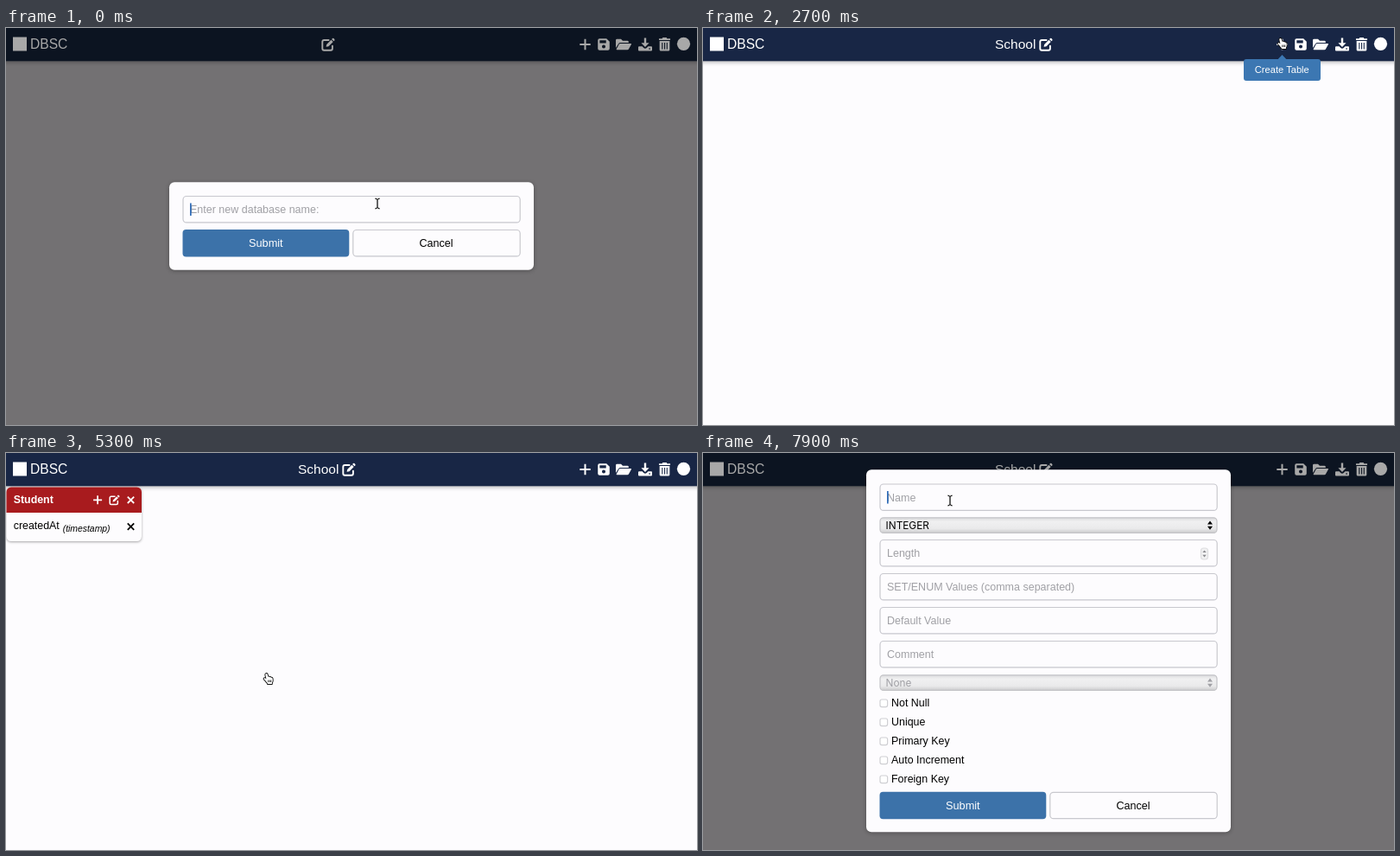
An HTML page with a canvas for the animation above (8 s loop, 800 by 459 pixels).

```html
<!DOCTYPE html>
<html lang="en">
<head>
<meta charset="utf-8">
<title>Schema editor</title>
<style>
html, body { margin: 0; width: 100%; height: 100%; overflow: hidden; background: #fdfcfe; }
canvas { display: block; width: 800px; height: 459px; }
</style>
</head>
<body>
<canvas id="stage"></canvas>
<script>
const W = 800, H = 459, LOOP = 8000, STEP = 100;
const SANS = '"Liberation Sans", Arial, sans-serif';
const UI = 'Inter, "Liberation Sans", sans-serif';
const PAPER = '#fdfcfe', LINE = '#c8c8ce', HINT = '#a0a0a5', BLUE = '#3c72a9';

const canvas = document.getElementById('stage');
const g = canvas.getContext('2d');
const dpr = window.devicePixelRatio || 1;
canvas.width = W * dpr;
canvas.height = H * dpr;

// Icons live in a 16 x 16 box.
const pencil = new Path2D('M5.6 10.6L6.2 7.9 11.4 2.7 13.7 5 8.5 10.2 5.9 10.8ZM12.1 2L13 1.1Q13.7.5 14.4 1.1L15.3 2Q15.9 2.7 15.3 3.4L14.4 4.3Z');
const sheet = new Path2D('M8.6 3H3.2Q1.3 3 1.3 4.9V12.8Q1.3 14.7 3.2 14.7H11Q12.9 14.7 12.9 12.8V9.6');
const icons = {
  save: 'M3 1H11.3L15 4.7V13Q15 15 13 15H3Q1 15 1 13V3Q1 1 3 1ZM3.2 3.2V6.4H10.8V3.2ZM8 8.4A2.1 2.1 0 1 0 8 12.6A2.1 2.1 0 1 0 8 8.4Z',
  folder: 'M-1 12V3.2Q-1 1.8 .4 1.8H5L7 3.7H12.4Q13.8 3.7 13.8 5.1V6H4Q2.9 6 2.3 7ZM3.9 7H16.3Q17.5 7 16.9 8.1L14 13.3Q13.5 14.2 12.4 14.2H.3Q-.8 14.2-.2 13.2L2.9 7.6Q3.2 7 3.9 7Z',
  download: 'M6.8 .5H9.2V6.2H12.6L8 11 3.4 6.2H6.8ZM0 11.3Q0 10.3 1 10.3H4.6L6.3 12Q8 13.3 9.7 12L11.4 10.3H15Q16 10.3 16 11.3V14.5Q16 15.5 15 15.5H1Q0 15.5 0 14.5ZM12.4 12.3V13.7H13.8V12.3Z',
  trash: 'M1.3 1.2H5L5.8 0H10.2L11 1.2H14.7V3H1.3ZM2 4.1H14V14.4Q14 16 12.4 16H3.6Q2 16 2 14.4ZM4.7 6.2V13.8H5.8V6.2ZM7.5 6.2V13.8H8.6V6.2ZM10.3 6.2V13.8H11.4V6.2Z'
};
for (const k in icons) icons[k] = new Path2D(icons[k]);

const hand = new Path2D('M3.4 1.2Q4.6.4 5.2 1.7L6.1 4.8Q7.3 4.2 7.8 5.2Q9 4.6 9.5 5.7Q10.9 5.4 11.2 6.8L11.4 9Q11.3 10.6 10.5 11.6V13H5.5V12.2Q4 11 3.2 9.6L1.2 7.4Q.9 6.2 2.2 6.1L4 7.3 2.9 2.6Q2.8 1.6 3.4 1.2Z');
const handLines = new Path2D('M6.3 8.5V11M7.9 8.5V11M9.4 8.5V11');
const arrow = new Path2D('M0 0V11.2L2.6 8.8 4.3 12.7 6.1 11.9 4.4 8.1H8Z');
const cross = new Path2D('M0-6L2.3-3.4H.8V-.8H3.4V-2.3L6 0 3.4 2.3V.8H.8V3.4H2.3L0 6-2.3 3.4H-.8V.8H-3.4V2.3L-6 0-3.4-2.3V-.8H-.8V-3.4H-2.3Z');

function box(x, y, w, h, r, fill, stroke) {
  g.beginPath();
  g.roundRect(x, y, w, h, r);
  if (fill) { g.fillStyle = fill; g.fill(); }
  if (stroke) { g.strokeStyle = stroke; g.lineWidth = 1.2; g.stroke(); }
}

function text(s, x, y, size, color, opt = {}) {
  g.font = `${opt.style || ''} ${size}px ${opt.font || SANS}`;
  g.textAlign = opt.align || 'left';
  g.fillStyle = color;
  g.fillText(s, x, y);
}

function lines(color, width, ...segs) {
  g.strokeStyle = color;
  g.lineWidth = width;
  g.beginPath();
  for (const [a, b, c, d] of segs) { g.moveTo(a, b); g.lineTo(c, d); }
  g.stroke();
}

function shadow(color, blur, dy) {
  g.shadowColor = color;
  g.shadowBlur = blur * dpr;
  g.shadowOffsetY = dy * dpr;
}

function at(x, y, scale, draw) {
  g.save();
  g.translate(x, y);
  g.scale(scale, scale);
  draw();
  g.restore();
}

function icon(name, x, y, size, color) {
  at(x - size / 2, y - size / 2, size / 16, () => {
    g.fillStyle = color;
    g.fill(icons[name], 'evenodd');
  });
}

function edit(x, y, size, color) {
  at(x - size / 2, y - size / 2, size / 16, () => {
    g.fillStyle = g.strokeStyle = color;
    g.lineWidth = 1.9;
    g.lineCap = 'round';
    g.stroke(sheet);
    g.fill(pencil);
  });
}

const plus = (x, y, r, w, c) => lines(c, w, [x - r, y, x + r, y], [x, y - r, x, y + r]);
const times = (x, y, r, w, c) => lines(c, w, [x - r, y - r, x + r, y + r], [x - r, y + r, x + r, y - r]);

function header(dim, named) {
  const ink = dim ? '#a8a8a8' : '#fff';
  g.save();
  shadow('rgba(0,0,0,.3)', 5, 1.5);
  g.fillStyle = dim ? '#0c1421' : '#182645';
  g.fillRect(-10, -10, W + 20, 48.3);
  g.restore();
  box(8, 10.5, 16, 16, 0, ink);
  text('DBSC', 28, 24, 15.6, ink);
  if (named) text('School', 338, 24, 15.5, ink);
  edit(named ? 397 : 373, 19, 16, ink);
  plus(670.5, 19, 6.2, 2, ink);
  icon('save', 692, 19, 15.5, ink);
  icon('folder', 715, 19, 16, ink);
  icon('download', 740, 19, 16, ink);
  icon('trash', 762.5, 18.8, 15.6, ink);
  g.fillStyle = ink;
  g.beginPath();
  g.arc(784.5, 18.3, 7.6, 0, 7);
  g.fill();
}

function tooltip() {
  g.fillStyle = '#3c77b2';
  g.beginPath();
  g.moveTo(670.5, 31);
  g.lineTo(675.5, 36.2);
  g.lineTo(665.5, 36.2);
  g.fill();
  box(626, 36, 89, 25, 3, '#3c77b2');
  text('Create Table', 670.3, 52.2, 11.1, '#fff', { align: 'center' });
}

function table(x, y) {
  g.save();
  g.translate(x, y);
  g.save();
  shadow('rgba(0,0,0,.35)', 3, 1);
  box(0, 0, 156.5, 62.5, 5.5, PAPER);
  g.restore();
  box(0, 0, 156.5, 29.5, [5.5, 5.5, 0, 0], '#a81b1e');
  text('Student', 8.2, 18.8, 12.4, '#fff', { style: 'bold' });
  plus(105.6, 14.8, 5, 1.7, '#fff');
  edit(125, 14.8, 12.6, '#fff');
  times(144, 14.8, 3.7, 1.8, '#fff');
  text('createdAt', 8.2, 48.6, 12.4, '#000');
  text('(timestamp)', 65.2, 51.2, 10.4, '#000', { style: 'italic' });
  times(144, 45.6, 3.7, 1.8, '#000');
  g.restore();
}

function panel(y, h) {
  g.save();
  shadow('rgba(0,0,0,.3)', 5, 1);
  box(189, y, 422, h, 6, PAPER);
  g.restore();
}

function field(y, hint, value = '', caret = false) {
  box(205, y + 0.5, 390.2, 30.4, 4, PAPER, LINE);
  text(value || hint, 213, y + 20.4, value ? 12.75 : 12.5, value ? '#000' : HINT);
  if (caret) {
    const x = 213 + (value ? g.measureText(value).width : 0);
    box(x, y + 8.5, 1.7, 14.5, 0, '#2f6cb8');
  }
}

function buttons(y, pressed) {
  box(204.5, y, 192.8, 31.4, 4, pressed ? '#2a547d' : BLUE);
  text('Submit', 300.8, y + 20.3, 12.75, pressed ? '#a2abb4' : '#fff', { align: 'center' });
  box(401.8, y + 0.5, 193.4, 30.4, 4, PAPER, LINE);
  text('Cancel', 498, y + 20.3, 12.6, '#000', { align: 'center' });
}

function chevrons(x, y, w, h, gap, color) {
  g.fillStyle = color;
  for (const s of [-1, 1]) {
    g.beginPath();
    g.moveTo(x - w, y + s * gap);
    g.lineTo(x + w, y + s * gap);
    g.lineTo(x, y + s * (gap + h));
    g.fill();
  }
}

function select(y, value, color) {
  const fill = g.createLinearGradient(0, y, 0, y + 18);
  fill.addColorStop(0, '#dcdcde');
  fill.addColorStop(0.25, '#f0f0f1');
  fill.addColorStop(0.7, '#eaeaeb');
  fill.addColorStop(1, '#c9c9cb');
  box(205, y, 390, 17.6, 4, fill, '#c4c4c7');
  text(value, 211.6, y + 13.2, 11.8, color, { font: UI });
  chevrons(587, y + 8.8, 3, 4, 1.2, color);
}

function nameDialog(value, caret, pressed) {
  panel(178.3, 101.5);
  field(194, 'Enter new database name:', value, caret);
  buttons(233, pressed);
}

function columnDialog() {
  panel(19.3, 419);
  field(35.5, 'Name', '', true);
  select(74.8, 'INTEGER', '#000');
  ['Length', 'SET/ENUM Values (comma separated)', 'Default Value', 'Comment']
    .forEach((hint, i) => field(100 + i * 39, hint));
  box(576.5, 110, 8, 13, 3, '#f1f1f2', '#dedee0');
  chevrons(580.5, 116.4, 2.2, 2.6, 1.4, '#8c8c90');
  select(256.8, 'None', HINT);
  ['Not Null', 'Unique', 'Primary Key', 'Auto Increment', 'Foreign Key'].forEach((label, i) => {
    const y = 289 + i * 22;
    box(205, y - 4, 8.6, 8.6, 2, '#fff', '#cfcfd3');
    text(label, 218, y + 4.4, 12.45, '#000');
  });
  buttons(391.8, false);
}

// time, x, y, shape until the next key
const path = [
  [0, 430, 203, 'beam'], [300, 430, 203, ''], [1100, 430, 203, 'beam'], [1200, 430, 203, 'beam'],
  [1600, 366, 252, 'hand'], [1900, 366, 252, 'arrow'], [2500, 670, 18, 'hand'],
  [3100, 670, 18, 'arrow'], [3500, 430, 208, 'beam'], [3600, 430, 208, ''],
  [4500, 430, 208, 'beam'], [4900, 303, 261, 'hand'], [5400, 303, 261, 'arrow'],
  [5800, 31.5, 61.5, 'move'], [5900, 31.5, 61.5, 'move'], [6400, 323, 214, 'move'],
  [6600, 323, 214, 'move'], [6900, 397, 208, 'hand'], [7200, 397, 208, 'arrow'],
  [7700, 286, 55, 'beam'], [8000, 286, 55, 'beam']
];

function pointer(t) {
  let i = 0;
  while (i < path.length - 2 && path[i + 1][0] <= t) i++;
  const [t0, x0, y0, shape] = path[i], [t1, x1, y1] = path[i + 1];
  const p = (t - t0) / (t1 - t0), e = p * p * (3 - 2 * p);
  return { x: x0 + (x1 - x0) * e, y: y0 + (y1 - y0) * e, shape };
}

function outlined(shape, fill, edge, width) {
  g.lineJoin = 'round';
  g.lineWidth = width;
  g.strokeStyle = edge;
  g.stroke(shape);
  g.fillStyle = fill;
  g.fill(shape);
}

const cursors = {
  beam() {
    const segs = [[0, -5, 0, 5], [-2.6, -6, -.5, -5.2], [2.6, -6, .5, -5.2], [-2.6, 6, -.5, 5.2], [2.6, 6, .5, 5.2]];
    lines('rgba(255,255,255,.8)', 2.6, ...segs);
    lines('#111', 1.3, ...segs);
  },
  hand() {
    g.translate(-5.6, -7);
    outlined(hand, '#fff', '#111', 1.8);
    lines('#111', 0.8);
    g.stroke(handLines);
  },
  arrow() { outlined(arrow, '#000', '#fff', 1.8); },
  move() { outlined(cross, '#000', '#fff', 2); }
};

const typed = (word, t, start, gap) =>
  word.slice(0, Math.max(0, Math.floor((t - start) / gap) + 1));

function render(t) {
  const first = t < 1800, second = t >= 3000 && t < 5100, third = t >= 7100;
  const dim = first || second || third;
  const p = pointer(t);

  g.setTransform(dpr, 0, 0, dpr, 0, 0);
  g.fillStyle = dim ? '#737173' : PAPER;
  g.fillRect(0, 0, W, H);
  header(dim, !first);

  if (t >= 5100 && !third) {
    const grab = pointer(Math.max(5900, Math.min(t, 6400)));
    table(grab.x - 31, grab.y - 22);
  }
  if (t >= 2500 && t < 3000) tooltip();
  if (first) nameDialog(typed('School', t, 300, 130), t < 1600, t >= 1700);
  if (second) nameDialog(typed('Student', t, 3700, 115), t < 5000, t >= 5000);
  if (third) columnDialog();

  if (p.shape) at(p.x, p.y, 1, cursors[p.shape]);
}

const begin = performance.now();
function tick() {
  const t = (performance.now() - begin) % LOOP;
  render(Math.floor(t / STEP) * STEP);
  requestAnimationFrame(tick);
}
tick();
</script>
</body>
</html>
```
